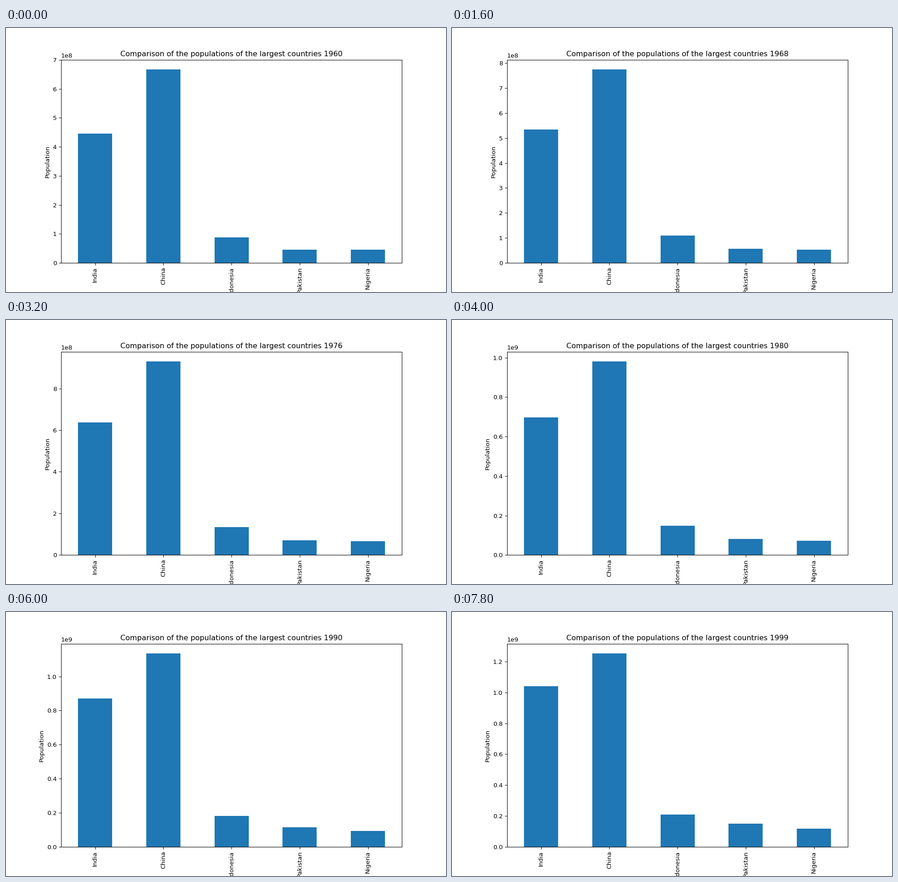
A matplotlib script for the animation above (8 s loop, 966x580 px).

```python
import numpy as np
import matplotlib.pyplot as plt
from matplotlib.animation import FuncAnimation

FIRST_YEAR = 1960
YEARS = 40
SCALE = 0.97  # text and line size relative to the defaults

# Millions of people at the start of each decade, 1960 to 2000
DECADES = {
    "India": [446, 557.5, 697, 870.5, 1059.6],
    "Indonesia": [88.4, 115.2, 148.2, 182.2, 214.1],
    "Pakistan": [46, 59.3, 80.6, 115.4, 154.4],
    "Nigeria": [45.1, 55.6, 73, 95.2, 122.9],
}
# China grows unevenly: turning points as years since 1960 and millions
CHINA_YEARS = [0, 1, 2, 4, 8, 12, 16, 20, 25, 30, 34, 39]
CHINA = [667, 660.3, 665.8, 698.4, 774.5, 862, 930.7, 981.2, 1051, 1135.2,
         1191.8, 1252.7]
COUNTRIES = ["India", "China", "Indonesia", "Pakistan", "Nigeria"]


def population(country, t):
    """Smooth curve through the decades, or straight runs for China."""
    if country == "China":
        return 1e6 * np.interp(t, CHINA_YEARS, CHINA)
    curve = np.polyfit(range(5), DECADES[country], 4)
    return 1e6 * np.polyval(curve, t / 10)


for key in ("font.size", "axes.linewidth", "axes.titlepad", "axes.labelpad",
            "xtick.major.size", "xtick.major.width", "xtick.major.pad",
            "ytick.major.size", "ytick.major.width", "ytick.major.pad"):
    plt.rcParams[key] *= SCALE

fig, ax = plt.subplots(figsize=(9.66, 5.8), dpi=100)


def draw(i):
    heights = [population(country, i) for country in COUNTRIES]
    ax.clear()
    ax.bar(range(len(COUNTRIES)), heights, width=0.5, color="#1f77b4")
    ax.set_xlim(-0.5, len(COUNTRIES) - 0.5)
    ax.set_ylim(0, 1.05 * max(heights))
    ax.set_xticks(range(len(COUNTRIES)), COUNTRIES, rotation=90)
    ax.set_ylabel("Population")
    ax.set_title("Comparison of the populations of the largest countries "
                 f"{FIRST_YEAR + i}")


anim = FuncAnimation(fig, draw, frames=YEARS, interval=200,
                     init_func=lambda: draw(0), repeat=True, repeat_delay=0)
plt.show()
```
